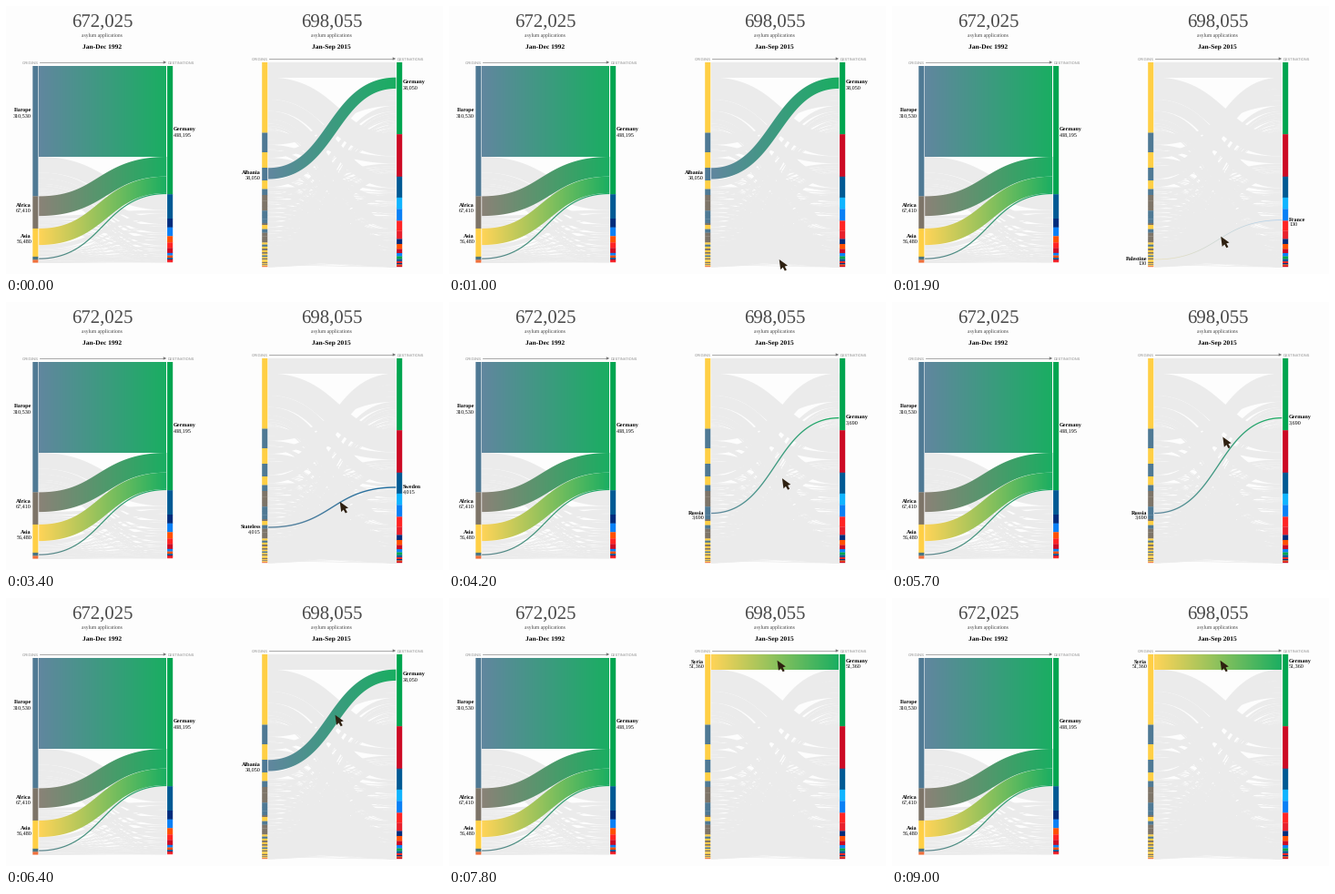
Recreate the animation shown at these times as a matplotlib script. Size 480 by 295 pixels, loop 9100 ms.

```python
import numpy as np
import matplotlib.pyplot as plt
from matplotlib.animation import FuncAnimation
from matplotlib.collections import PolyCollection
from matplotlib.colors import LinearSegmentedColormap
from matplotlib.patches import Polygon, Rectangle
from matplotlib.path import Path

W, H, DPI = 480, 295, 100
FRAMES, STEP = 91, 100
PX = 72 / DPI
SERIF, SANS = "Liberation Serif", "Liberation Sans"
BAR = 6.1

BLUE, BROWN, YELLOW, ORANGE = "#4f7994", "#7d7468", "#ffcf45", "#f0703c"
GREEN, RED, DEEP, CYAN = "#00a550", "#cc0a24", "#005a94", "#10b4ff"
AZURE, NAVY, SCARLET, FLAME = "#0a80f5", "#002c7c", "#ff2424", "#ff5000"
GRAY, PAPER = "#ebebeb", "#fdfdfd"

plt.rcParams["text.hinting"] = "no_hinting"
fig = plt.figure(figsize=(W / DPI, H / DPI), dpi=DPI, facecolor=PAPER)
ax = fig.add_axes([0, 0, 1, 1])
ax.axis("off")


def text(x, y, s, size, color="#333333", family=SERIF, **kw):
    return ax.text(x, y, s, fontsize=size * PX, color=color, family=family,
                   va="baseline", **kw)


def label(x, y, name, value, ha):
    return [text(x, y + 1, name, 6.1, "black", weight="bold", ha=ha, zorder=6),
            text(x, y + 7, value, 6.2, "black", ha=ha, zorder=6)]


def ribbon(x0, y0, x1, y1, width, n=30):
    """Outline of an S-shaped band of constant thickness."""
    t = np.linspace(0, 1, n)
    dx, dy = x1 - x0, y1 - y0
    x = x0 + dx * (1.5 * t * (1 - t) + t ** 3)
    y = y0 + dy * (3 * t ** 2 - 2 * t ** 3)
    tx = dx * (1.5 - 3 * t + 3 * t ** 2)
    ty = dy * 6 * t * (1 - t)
    k = width / 2 / np.hypot(tx, ty)
    upper = np.column_stack([x + ty * k, y - tx * k])
    lower = np.column_stack([x - ty * k, y + tx * k])
    return np.vstack([upper, lower[::-1]])


def soften(color, amount=0.1):
    rgb = np.array([int(color[i:i + 2], 16) / 255 for i in (1, 3, 5)])
    return tuple(rgb + (1 - rgb) * amount)


def gradient_ribbon(x0, y0, x1, y1, width, c0, c1, alpha=1):
    cmap = LinearSegmentedColormap.from_list("flow", [soften(c0), soften(c1)])
    image = ax.imshow(np.linspace(0, 1, 256)[None, :], cmap=cmap, aspect="auto",
                      extent=(x0, x1, H, 0), interpolation="bilinear",
                      alpha=alpha, zorder=3)
    outline = ribbon(x0, y0, x1, y1, width, 60)
    image.set_clip_path(Path(outline), ax.transData)
    return image


def bars(x, top, heights, colors):
    """Stacked bars; each reaches under the next so no seam shows."""
    for y, h, c in zip(starts(top, heights), heights, colors):
        ax.add_patch(Rectangle((x, y), BAR, h + 0.2, fc=c, lw=0, snap=False,
                               zorder=4))


def balance(seed, rows, cols):
    """Scale a matrix until its sums fit both margins."""
    m = seed.copy()
    for _ in range(80):
        m *= (rows / m.sum(1))[:, None]
        m *= cols / m.sum(0)
    return m


def gray_flows(x0, x1, src, dst, m, row_order, col_order):
    """Stack every flow along both sides; src and dst hold the start heights."""
    start, end = np.zeros_like(m), np.zeros_like(m)
    for i, order in enumerate(row_order):
        start[i, order] = src[i] + np.cumsum(m[i, order]) - m[i, order] / 2
    for j, order in enumerate(col_order):
        end[order, j] = dst[j] + np.cumsum(m[order, j]) - m[order, j] / 2
    shapes = [ribbon(x0, start[i, j], x1, end[i, j], max(m[i, j], 0.7))
              for i, j in np.ndindex(m.shape) if m[i, j] > 0.005]
    ax.add_collection(PolyCollection(shapes, facecolors=GRAY, linewidths=0,
                                     zorder=1))


def header(cx, total, period, x_bar, y):
    text(cx, 24, total, 20.8, "#4a4a4a", ha="center")
    text(cx, 33.4, "asylum applications", 5.6, "#444444", ha="center")
    text(cx, 47.4, period, 7.5, "black", weight="bold", ha="center")
    text(x_bar + 6.5, y + 1.6, "ORIGINS", 4.3, "#8a8a8a", SANS, ha="right")
    text(x_bar + 148, y + 1.6, "DESTINATIONS", 4.05, "#8a8a8a", SANS)
    ax.plot([x_bar + 8, x_bar + 145], [y, y], color="#999999", lw=0.6, zorder=2)
    tip = x_bar + 147
    ax.add_patch(Polygon([(tip, y), (tip - 3.5, y - 1.7), (tip - 3.5, y + 1.7)],
                         fc="#777777", lw=0, zorder=2))


def starts(top, heights):
    return top + np.cumsum(heights) - heights


def draw_left():
    x0, x1, top = 29.3, 177.1, 66
    header(105.5, "672,025", "Jan-Dec 1992", x0, 62)
    src = np.array([143.4, 35.5, 31, 3.5, 3])
    dst = np.array([141.2, 26.8, 9.7, 9.6, 7, 6, 5.5, 2.8, 2.4, 2, 1.6, 1.4])
    src_colors = [BLUE, BROWN, YELLOW, "#4a7480", ORANGE]
    dst_colors = [GREEN, DEEP, NAVY, AZURE, FLAME, SCARLET, RED, AZURE, FLAME,
                  DEEP, RED, SCARLET]
    bars(x0, top, src, src_colors)
    bars(x1, top, dst, dst_colors)

    to_main = np.array([100, 21.7, 18.2, 1.2, 0])
    begin, end = starts(top, src), starts(top, to_main)
    for b, e, w, c in zip(begin[:4], end, to_main, src_colors):
        y = b + w / 2 + (1.6 if w < 2 else 0)
        gradient_ribbon(x0 + 6.9, y, x1 - 0.8, e + w / 2, w, c, GREEN)

    rest = src - to_main
    others = dst[1:] * rest.sum() / dst[1:].sum()
    rng = np.random.default_rng(4)
    m = balance(rng.uniform(0.3, 1.5, (5, 11)), rest, others)
    gray_flows(x0 + 6.9, x1 - 0.8, begin + to_main, starts(top, dst)[1:], m,
               [np.arange(11)] * 5, [np.arange(5)] * 11)

    label(28, 116, "Europe", "310,530", "right")
    label(28, 219.8, "Africa", "67,410", "right")
    label(28, 254, "Asia", "56,480", "right")
    label(184, 136.8, "Germany", "438,195", "left")


def draw_right():
    x0, x1, top, height = 281.2, 429.1, 62, 225
    header(357.5, "698,055", "Jan-Sep 2015", x0, 58)
    src = np.array([77.5, 21.5, 17, 14, 9.5, 6.5, 6.2, 5.8, 5.2, 4.8, 4.6, 4.4,
                    2, 4.6, 4, 3.8, 3.6, 3.4, 2.2, *np.linspace(2.2, 0.85, 16)])
    dst = np.array([79, 46.5, 23, 12.5, 13, 11, 9, 5.5, 5.5, 4.5, 3.5, 3, 2.5,
                    2, 1.5, 1.2, 1.3])
    src *= height / src.sum()
    dst *= height / dst.sum()
    key = {"Y": YELLOW, "B": BLUE, "N": BROWN, "O": ORANGE}
    bars(x0, top, src, [key[c] for c in "YBYBYBNNNBBBNYBNNNYBYNYNYBYNYYNYNYO"])
    bars(x1, top, dst, [GREEN, RED, DEEP, CYAN, AZURE, SCARLET, "#e8202c", NAVY,
                        FLAME, RED, AZURE, GREEN, DEEP, SCARLET, NAVY, FLAME,
                        RED])

    # The two broad flows keep their width; the rest fills the margins.
    fixed = np.zeros((len(src), len(dst)))
    fixed[0, 0], fixed[3, 0] = 16.55, 12.27
    seed = np.random.default_rng(11).random(fixed.shape) ** 2.5 + 0.01
    seed[fixed > 0] = 0
    m = fixed + balance(seed, src - fixed.sum(1), dst - fixed.sum(0))
    rank = -(m + 100 * fixed)
    gray_flows(x0 + 6.9, x1 - 0.8, starts(top, src), starts(top, dst), m,
               np.argsort(rank, axis=1), np.argsort(rank, axis=0).T)


def highlight(origin, target, value, y0, y1, width, c0, c1, alpha=1):
    return [gradient_ribbon(288.1, y0, 428.3, y1, width, c0, c1, alpha),
            *label(280, y0, origin, value, "right"),
            *label(436, y1, target, value, "left")]


draw_left()
draw_right()

flows = {
    "Albania": highlight("Albania", "Germany", "38,050", 184.4, 84.8, 12.27,
                         BLUE, GREEN),
    "Palestine": highlight("Palestine", "France", "130", 279, 235.6, 0.7,
                           "#e8d9a0", "#8fc0ee", 0.8),
    "Stateless": highlight("Stateless", "Sweden", "4,015", 248, 204, 1.4,
                           BLUE, DEEP),
    "Russia": highlight("Russia", "Germany", "3,690", 232.5, 127.6, 1.3,
                        BLUE, GREEN),
    "Syria": highlight("Syria", "Germany", "51,360", 70.3, 70.3, 16.55,
                       YELLOW, GREEN),
}
schedule = [(0, "Albania"), (1200, "Palestine"), (2600, "Stateless"),
            (4200, "Russia"), (6000, "Albania"), (7600, "Syria")]

ARROW = np.array([(0, 0), (1.5, 11.2), (4, 8.7), (6.2, 12.6), (8.2, 11.5),
                  (6.1, 7.7), (9.3, 6.7)])
cursor = Polygon(ARROW, fc="#2e2010", lw=0, zorder=8)
ax.add_patch(cursor)
PATH_T = [500, 1900, 3400, 5000, 6400, 7800]
PATH_X = [363.5, 361.2, 366.7, 365.2, 361.5, 360.5]
PATH_Y = [293, 253.7, 219.9, 168.4, 128.7, 68.7]

ax.set_xlim(0, W)
ax.set_ylim(H, 0)


def update(frame):
    t = frame * STEP
    active = [name for begin, name in schedule if t >= begin][-1]
    for name, artists in flows.items():
        for artist in artists:
            artist.set_visible(name == active)
    cursor.set_visible(t >= 500)
    cursor.set_xy(ARROW + [np.interp(t, PATH_T, PATH_X),
                           np.interp(t, PATH_T, PATH_Y)])
    return []


anim = FuncAnimation(fig, update, frames=FRAMES, interval=STEP, repeat=True,
                     repeat_delay=0, blit=False)
plt.show()
```
